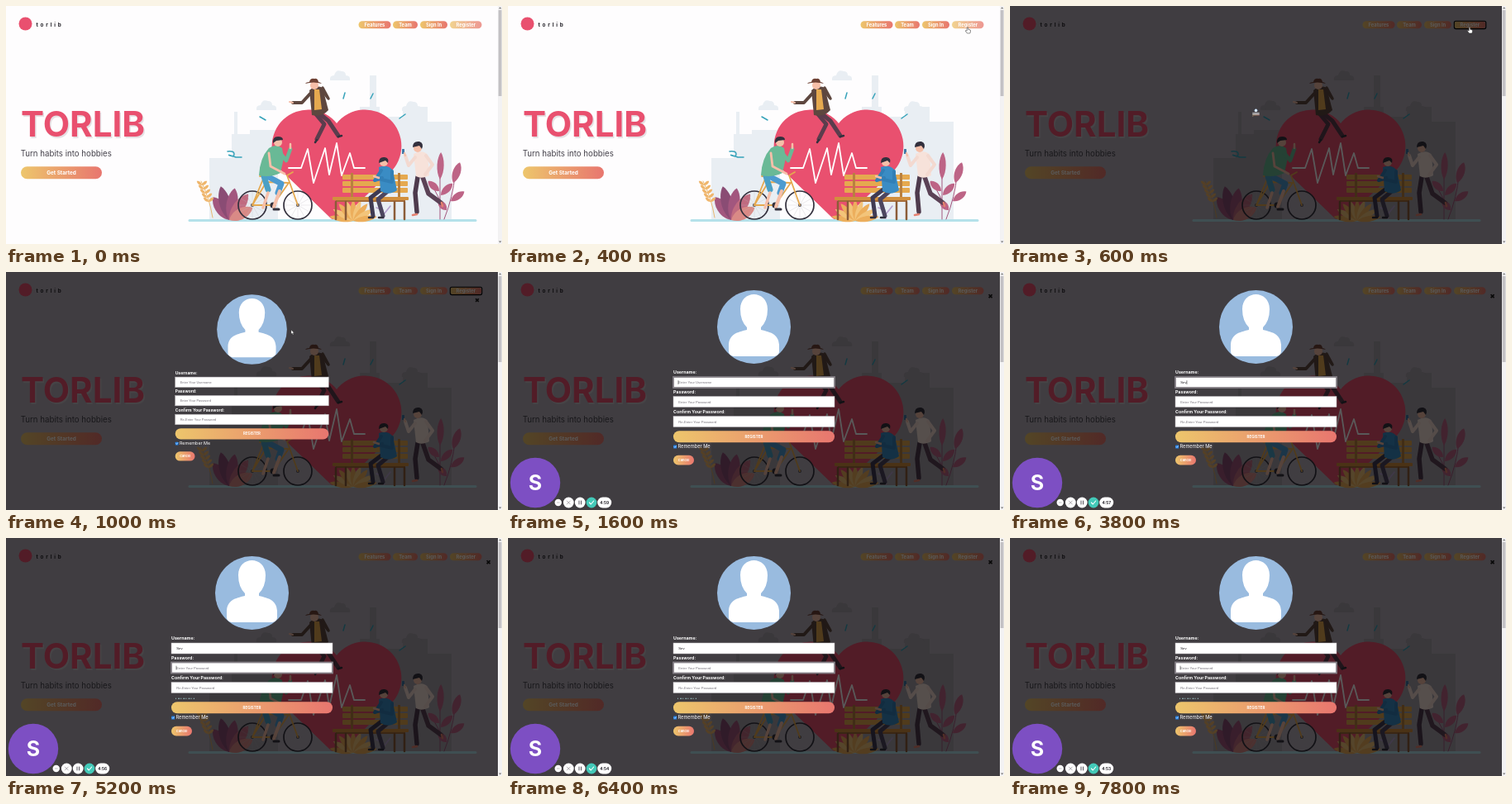
Write an HTML page that moves like this. It is 600 by 288 pixels and loops after 8000 ms.

```html
<!DOCTYPE html>
<html lang="en">
<head>
<meta charset="utf-8">
<title>Sign-up form</title>
<style>
html, body { margin: 0; width: 100%; height: 100%; overflow: hidden; background: #fefdfe; }
svg { display: block; width: 100%; height: 100%; font-family: Inter, "Open Sans", sans-serif; }
.b { font-weight: 700; }
.mid { text-anchor: middle; }
.w { fill: #fff; }
.hint { font: 4.2px "Liberation Sans", Arial, sans-serif; fill: #75717a; }
.line { fill: none; stroke-linecap: round; stroke-linejoin: round; }
#bg { fill: #fefdfe; }
#city { fill: #e9eef3; }
.dim #bg { fill: #403d41; }
.dim #city { fill: #3a383b; }
.dim #page { filter: brightness(.35); }
</style>
</head>
<body>
<svg id="stage" viewBox="0 0 600 288" preserveAspectRatio="none">
  <defs>
    <linearGradient id="warm"><stop stop-color="#edc66c"/><stop offset="1" stop-color="#e8766f"/></linearGradient>
    <clipPath id="face"><circle cx="297.5" cy="66.5" r="44.5"/></clipPath>
  </defs>
  <rect id="bg" width="600" height="288"/>
  <g id="city"></g>
  <g id="page"></g>
  <g id="modal"></g>
  <g id="recorder"></g>
  <g id="scroll">
    <rect x="595" width="5" height="288" fill="#f3f2f3"/>
    <rect x="595.7" y="5" width="3.8" height="104" fill="#c3c1c4"/>
    <path d="M596 3.2l1.7-2 1.7 2zM596 284.5l1.7 2 1.7-2z" fill="#777"/>
  </g>
  <path id="arrow" d="M0 0v5l1.2-1 .9 1.9.9-.4-.9-1.9h1.6z" fill="#fff" stroke="#222" stroke-width=".4"/>
  <path id="hand" d="M-.8-3q.8-1 1.5 0v2.3l2.6.7q.7 2-.5 4h-3.4l-2.2-3q.2-1 2 0z" fill="#fff" stroke="#222" stroke-width=".5"/>
</svg>
<script>
const $ = id => document.getElementById(id);
const rect = (x, y, w, h, fill, r = 0, more = '') =>
  `<rect x="${x}" y="${y}" width="${w}" height="${h}" rx="${r}" fill="${fill}" ${more}/>`;
const circle = (x, y, r, fill, more = '') => `<circle cx="${x}" cy="${y}" r="${r}" fill="${fill}" ${more}/>`;
const shape = (d, fill) => `<path d="${d}" fill="${fill}"/>`;
const line = (d, color, w = 1) => `<path class="line" d="${d}" stroke="${color}" stroke-width="${w}"/>`;
const text = (x, y, size, str, cls = '', more = '') =>
  `<text x="${x}" y="${y}" font-size="${size}" class="${cls}" ${more}>${str}</text>`;
const pill = (x, y, w, h, label, size) =>
  rect(x, y, w, h, 'url(#warm)', h / 2) + text(x + w / 2, y + h / 2 + size * .36, size, label, 'b mid w');
const leaf = (x, y, w, h, turn, fill) =>
  `<path transform="translate(${x} ${y}) rotate(${turn})" d="M0 0C${-w} ${-h * .3} ${-w * .8} ${-h * .8} 0 ${-h}C${w * .8} ${-h * .8} ${w} ${-h * .3} 0 0" fill="${fill}"/>`;

const INK = '#33303d', PINK = '#e9506f', SKIN = '#f6bfa9', GOLD = '#e5a94f', TEAL = '#37a3ba', PLUM = '#a2567e';

const cloud = (x, y) => `<path d="M${x - 12} ${y + 5}q-1-6 5-6q2-8 9-5q5 0 5 5q6 0 5 6z"/>`;

function drawCity() {
  const blocks = [[246, 184, 28], [273, 155, 24], [276, 128, 4], [295, 150, 34], [428, 122, 24], [440, 84, 8],
    [452, 134, 28], [480, 122, 30], [510, 140, 29]];
  $('city').innerHTML = blocks.map(([x, y, w]) => `<rect x="${x}" y="${y}" width="${w}" height="${259 - y}"/>`).join('') +
    [[404, 85], [491, 122], [315, 121]].map(p => cloud(...p)).join('');
}

function wheel(x) {
  let s = circle(x, 241, 17, 'none', `stroke="${INK}" stroke-width="1.7"`) + circle(x, 241, 2, INK);
  for (let i = 0; i < 6; i++)
    s += `<path d="M${x - 16} 241h32" stroke="#b9b5bd" stroke-width=".25" transform="rotate(${i * 30} ${x} 241)"/>`;
  return s;
}

function plants() {
  let s = '';
  [[-35, 34, PLUM], [-14, 42, '#8a4c74'], [10, 39, PLUM], [36, 39, '#c06b80'], [62, 32, '#d98a86']]
    .forEach(([a, h, c]) => s += leaf(270, 259, 10, h, a, c));
  s += line('M250 256Q246 232 236 212', GOLD, .8);
  for (let i = 0; i < 5; i++)
    s += leaf(237 + i * 2, 217 + i * 5, 2.5, 8, -50, '#efb66d') + leaf(237 + i * 2, 217 + i * 5, 2.5, 8, 50, '#efb66d');
  for (let i = -4; i <= 4; i++)
    s += leaf(420, 260, 5, 25 + Math.abs(i), i * 20, i % 2 ? '#f3c47a' : '#ecae5c');
  s += line('M457 257Q456 245 452 236M457 252l8-10M456 247l-8-3', '#b7a1cf', 1.6);
  s += line('M525 258V208M530 258Q541 230 543 205M525 235L515 216', PLUM, 1);
  [[525, 210, 6, 33, 2], [524, 224, 6, 18, -48], [526, 229, 6, 20, 45], [541, 214, 7, 26, 18],
    [538, 236, 6, 20, 55], [533, 247, 6, 15, -42]].forEach(a => s += leaf(...a, '#bd6486'));
  return s;
}

function sitter() {
  return line('M379 130L390 139L402 157', '#5b3d4d', 5) + line('M375 131L385 143L376 161', '#5b3d4d', 5) +
    line('M376 162l-2 3M402 158l4-1', INK, 2.5) +
    shape('M367 102q8-7 16-3l7 27q-8 9-20 6z', '#5e473f') + shape('M373 101l6 0 3 24-9 1z', GOLD) +
    line('M368 106L358 117L347 117', '#5e473f', 4) + line('M347 117l-4-1', SKIN, 2) +
    line('M383 103L390 112L383 99', '#5e473f', 3.5) +
    circle(373, 96, 5, SKIN) + shape('M362 94q10-3 20 0q-2-2-4-2q-1-5-5-4q-5-1-6 4q-4 0-5 2', '#6f4235');
}

function cyclist() {
  return wheel(298) + wheel(353) +
    line('M298 241L315 213L342 214L323 241ZL312 207M353 241L340 205L347 201M307 206h11', GOLD, 1.8) +
    circle(323, 241, 3.5, INK) +
    line('M316 206L333 215L329 226', '#4c9bd0', 7) + line('M331 224L324 243', SKIN, 4) +
    line('M324 246h6', INK, 3) + line('M312 206L317 222', '#4ba0c4', 7) + line('M317 226L311 244', SKIN, 3.5) +
    shape('M318 172q9-6 16 0l2 12-4 18q-12 6-26 3q1-21 12-33', '#69b996') +
    line('M331 177L339 187L344 173', '#69b996', 4.5) + line('M344 172v-5', SKIN, 2.5) +
    line('M318 178L320 194L337 203', SKIN, 2.8) +
    circle(329, 165, 5, SKIN) + shape('M323 166q-1-8 6-8q6 0 6 4l-8 1z', INK);
}

function bench() {
  let s = '';
  for (let i = 0; i < 3; i++) s += rect(407, 204 + i * 8, 79, 6, GOLD, 1);
  return s + rect(417, 202, 3, 33, '#b9803f') + rect(474, 202, 3, 33, '#b9803f') +
    rect(395, 231, 92, 4, '#d2903e', 1) + rect(399, 235, 84, 2, '#a56c3a') +
    line('M399 237v21M411 237v21M470 237v21M482 237v21', '#8b5c38', 2.5);
}

function friends() {
  return line('M454 222L441 232L444 254', '#3f3a52', 5) + line('M463 223L450 234L456 254', '#4d465f', 5) +
    line('M444 256h-5M456 256h-5', INK, 2.5) +
    shape('M451 195q11-4 17 4l5 24q-10 7-20 1z', '#3a8cc4') +
    line('M454 199L446 211L455 208M467 200L467 213L454 210', '#327fb6', 4) +
    line('M445 206l6 2', SKIN, 2.4) + circle(457, 189, 5, SKIN) + shape('M451 190q0-8 7-7q6 1 4 7l-3-3z', INK) +
    line('M498 207L495 226L497 249', '#4d3a4c', 5.5) + line('M504 207L511 227L526 238', '#5b4256', 5.5) +
    line('M497 252l-5 1M527 238l1 4', '#e58170', 2.6) +
    shape('M493 179q11-6 17 1l2 25q-9 5-16 1z', '#f7e2da') +
    line('M495 183L487 193L483 181', '#f3d9d0', 4) + line('M508 181L516 192L507 204', '#f3d9d0', 4) +
    rect(479, 173, 3, 6, '#3f78a6', .5) + line('M483 181l-1-3', SKIN, 2.2) +
    circle(498, 172, 5, SKIN) + shape('M492 171q0-8 8-7q6 2 3 9l-3-4z', INK);
}

function drawPage() {
  const heart = 'M400 142A44 44 0 1 0 336 202L393 257Q400 262 407 257L464 202A44 44 0 1 0 400 142Z';
  const pulse = 'M342 196H357L365 173L372 214L386 172L391 204L400 166L406 205L416 178L421 196H434';
  const nav = [[426.5, 39, 'Features'], [468, 30, 'Team'], [501, 33, 'Sign In'], [537, 38.5, 'Register']];
  $('page').innerHTML =
    circle(23.5, 21.5, 8, PINK) +
    text(36.5, 24.9, 6.3, 'torlib', 'b', 'fill="#211f26" letter-spacing="2.8"') +
    nav.map(([x, w, s]) => `<g id="${s}">${pill(x, 18.3, w, 9, s, 5.8)}</g>`).join('') +
    rect(537.3, 18.2, 38.5, 9.4, 'none', 2, 'id="ring" stroke="#000" stroke-width="1.1"') +
    text(19.5, 159.6, 42, 'TORLIB', 'b', 'fill="#d5cfd3" opacity=".6"') +
    text(18, 158.3, 42, 'TORLIB', 'b', `fill="${PINK}"`) +
    text(17.8, 182.2, 9.7, 'Turn habits into hobbies', '', 'fill="#45424b"') +
    pill(18, 194.3, 98, 15, 'Get Started', 6.4) +
    shape(heart, PINK) + line(pulse, '#fff', 1.8) +
    line('M222 259.5H568', '#b5e1ea', 3) +
    line('M307 134l7 4M410 105l-2 7M476 136l7-5M441 112l3-6M268 176q8-1 8 3t-5 2t7 2l7 0', TEAL, 1.5) +
    plants() + bench() + cyclist() + sitter() + friends();
}

function field(id, y, label, hint) {
  return text(200, y - 3.7, 5.3, label, 'b w') +
    rect(200, y, 195, 13, '#fff', 0, `id="${id}" stroke="#aaa6ab"`) +
    `<text id="${id}Text" class="hint" x="206.3" y="${y + 8}">${hint}</text>`;
}

function drawModal() {
  $('modal').innerHTML =
    circle(297.5, 66.5, 44.5, '#99bbdf') +
    '<g clip-path="url(#face)">' +
    shape('M281 45C281 21 314 21 314 45Q314 59 306 67V70C318 73 327 75 328 88V96Q328 101 322 102H273Q267 101 267 96V88C268 75 277 73 289 70V67Q281 59 281 45Z', '#fff') + '</g>' +
    text(583.7, 32, 8.5, '×', 'b mid', 'fill="#080808" stroke="#080808" stroke-width=".5"') +
    field('user', 127, 'Username:', 'Enter Your Username') +
    field('pass', 150.5, 'Password:', 'Enter Your Password') +
    field('again', 174.5, 'Confirm Your Password:', 'Re-Enter Your Password') +
    '<path id="note" d="M205 194.2h23" stroke="#a9d5d7" stroke-width="1.1" stroke-dasharray="1 2.2 1.8 1.2"/>' +
    '<path id="caret" d="M0-3.8v4.8" stroke="#111" stroke-width=".5"/>' +
    '<g id="actions">' + pill(200, 192.2, 195, 14, 'REGISTER', 4.5) +
    rect(200.1, 209.5, 4, 4, '#2582e6', .6) + line('M201 211.5l.9.9 1.4-1.8', '#fff', .6) +
    text(205.5, 213.4, 5.7, 'Remember Me', 'w') +
    pill(200, 221.8, 25, 11.8, 'Cancel', 4) + '</g>';
}

function drawRecorder() {
  $('recorder').innerHTML =
    circle(33, 255, 30.2, '#7d4fc3') + text(33, 264, 25, 'S', 'b mid w') +
    circle(60.7, 279, 4.2, '#fff') + line('M59.2 279h3', '#aaa', .7) +
    circle(73.3, 279, 6.4, '#fff') + line('M71.3 277l4 4m0-4l-4 4', '#8b878f', .7) +
    circle(87.2, 279, 6.4, '#fff') + line('M86 277v4m2.5-4v4', '#55515a', 1) +
    circle(101, 279, 6.4, '#43c9b8') + line('M98.4 279l1.9 2 3.4-4', '#fff', 1.1) +
    rect(108.2, 272.6, 17, 12.8, '#fff', 6.4) + text(116.7, 280.8, 4.8, '', 'b mid', 'id="clock" fill="#29262d"');
}

// Same curve as the CSS "ease" keyword
function ease(x) {
  if (x <= 0 || x >= 1) return x <= 0 ? 0 : 1;
  const bez = (a, b, u) => 3 * a * u * (1 - u) ** 2 + 3 * b * u * u * (1 - u) + u ** 3;
  let lo = 0, hi = 1;
  for (let i = 0; i < 24; i++) {
    const m = (lo + hi) / 2;
    if (bez(.25, .25, m) < x) lo = m; else hi = m;
  }
  return bez(.1, 1, lo);
}

const LOOP = 8000, OPEN = 565, FOCUS = 1600, RECORD = 1500, TYPE = 3000, NEXT = 4750, NAME = 'Sev';
const route = [[150, 592, 62], [400, 556, 29], [650, 556, 29], [1000, 345, 70], [1400, 285, 132], [1600, 285, 133]];

const show = (id, on) => $(id).setAttribute('visibility', on ? 'visible' : 'hidden');

function pointer(t) {
  const i = route.findIndex((p, k) => k && t < p[0]);
  const on = i > 0 && t >= route[0][0];
  const hand = t >= 350 && t < 700;
  show('hand', on && hand);
  show('arrow', on && !hand);
  if (!on) return;
  const [a, b] = [route[i - 1], route[i]];
  const k = ease((t - a[0]) / (b[0] - a[0]));
  $(hand ? 'hand' : 'arrow').setAttribute('transform',
    `translate(${a[1] + (b[1] - a[1]) * k} ${a[2] + (b[2] - a[2]) * k})`);
}

function focus(id, on) {
  $(id).setAttribute('stroke', on ? '#858087' : '#b6b2b7');
  $(id).setAttribute('stroke-width', on ? 1.8 : .5);
}

function render(t) {
  const open = t >= OPEN, next = t >= NEXT;
  $('stage').classList.toggle('dim', open);
  $('Register').setAttribute('opacity', open ? 1 : .75);
  show('ring', t >= 420 && t < FOCUS);
  $('modal').setAttribute('display', open ? 'inline' : 'none');
  $('modal').setAttribute('transform', `translate(297.5 129) scale(${ease((t - OPEN) / 600)}) translate(-297.5 -129)`);

  const count = Math.max(0, Math.min(NAME.length, Math.floor((t - TYPE) / 200)));
  $('userText').textContent = count ? NAME.slice(0, count) : 'Enter Your Username';
  $('userText').style.fill = count ? '#17151a' : '';
  focus('user', t >= FOCUS && !next);
  focus('pass', next);
  focus('again', false);
  $('note').setAttribute('display', next ? 'inline' : 'none');
  $('actions').setAttribute('transform', `translate(0 ${next ? 6 : 0})`);

  const since = next ? t - NEXT : count && t < TYPE + 1000 ? 0 : t - FOCUS;
  $('caret').setAttribute('display', t >= FOCUS && since % 1000 < 500 ? 'inline' : 'none');
  const x = 206 + (count && !next ? $('userText').getComputedTextLength() + .7 : 0);
  $('caret').setAttribute('transform', `translate(${x} ${next ? 158.5 : 135})`);

  $('recorder').setAttribute('display', t >= RECORD ? 'inline' : 'none');
  $('clock').textContent = '4:' + (58 - Math.floor((t - 2400) / 1000));
  pointer(t);
}

drawCity();
drawPage();
drawModal();
drawRecorder();
const start = performance.now();
function tick() {
  render((performance.now() - start) % LOOP);
  requestAnimationFrame(tick);
}
tick();
</script>
</body>
</html>
```
